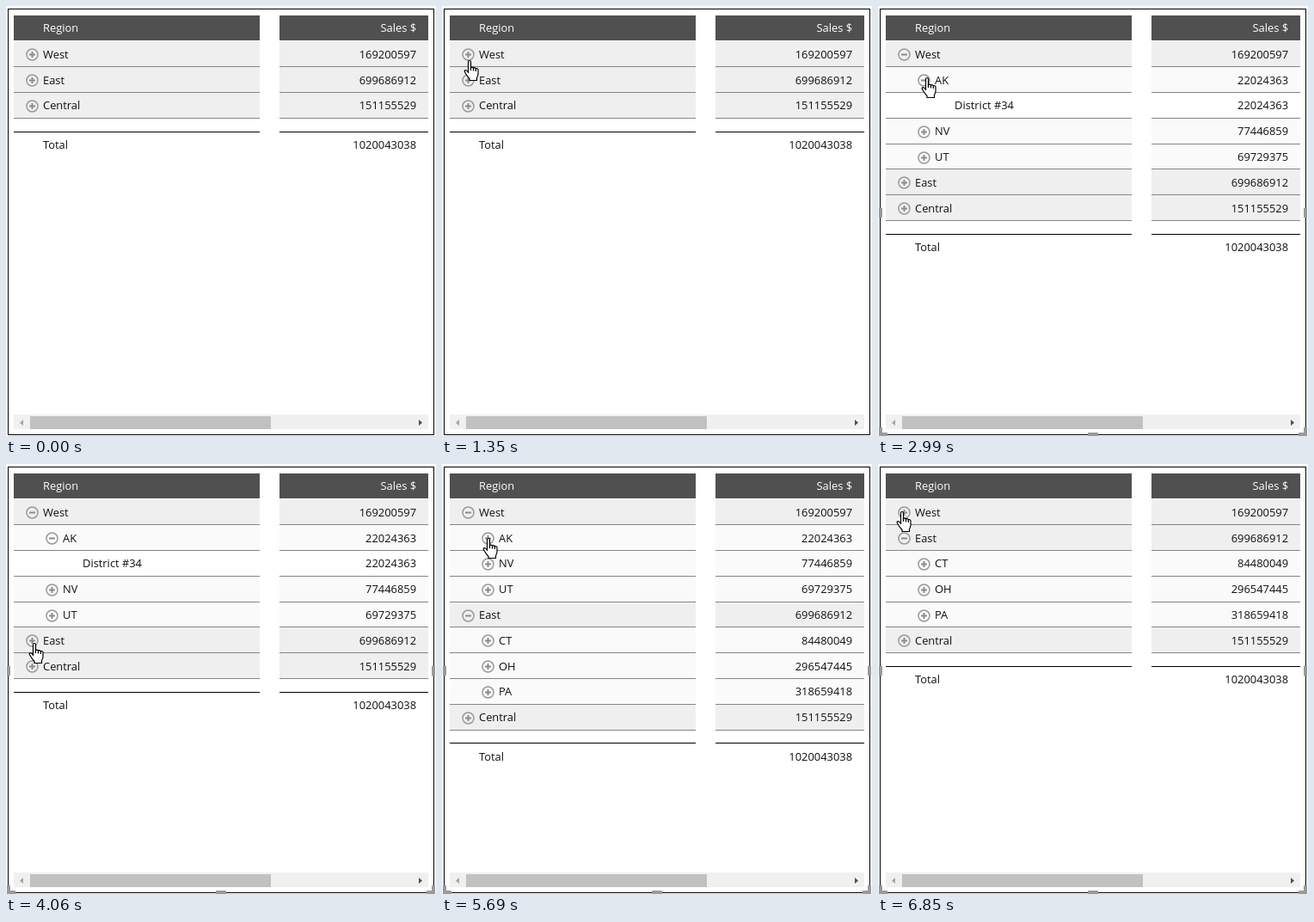
Recreate the animation shown at these times as an HTML page with a canvas. Size 500 by 500 pixels, loop 7820 ms.

```html
<!DOCTYPE html>
<html lang="en">
<head>
<meta charset="utf-8">
<title>Expandable sales table</title>
<style>
  html, body { margin: 0; width: 100%; height: 100%; overflow: hidden; background: #fff; }
  canvas { display: block; width: 500px; height: 500px; }
</style>
</head>
<body>
<canvas id="stage" width="500" height="500"></canvas>
<script>
const ctx = document.getElementById('stage').getContext('2d');
const LOOP = 7820;
const ROW_H = 29.8;
const TOP = 40.8;
const ICON_X = [30.5, 53.5];
const TEXT_X = [43, 66, 89];
const ROW_FILL = ['#efefef', '#fafafa', '#ffffff'];
const COLUMNS = [[9, 286], [318, 173]];
const SELECTED_AT = 1930;

const node = (name, sales, children = []) => ({ name, sales, children });
const regions = [
  node('West', 169200597, [
    node('AK', 22024363, [node('District #34', 22024363)]),
    node('NV', 77446859),
    node('UT', 69729375)
  ]),
  node('East', 699686912, [
    node('CT', 84480049),
    node('OH', 296547445),
    node('PA', 318659418)
  ]),
  node('Central', 151155529)
];

const expansions = [
  [0, []],
  [1930, ['West']],
  [2990, ['West', 'AK']],
  [4360, ['West', 'AK', 'East']],
  [5690, ['West', 'East']],
  [6850, ['East']]
];

// Pointer hot spot: time, x, y
const pointerPath = [
  [400, 2, 324], [700, 9, 187], [1190, 40, 74], [1350, 31, 63], [1560, 30, 57],
  [2130, 30, 57], [2730, 56, 83],
  [3150, 56, 83], [3680, 33, 223], [3810, 32, 212], [3960, 32, 212], [4060, 32, 208],
  [4710, 32, 208], [5280, 53, 86],
  [5780, 53, 86], [6130, 19, 59], [6240, 19, 59], [6390, 27, 55], [LOOP, 27, 55]
];

const ARROW = new Path2D('M.5.5V16.5L4.2 13L6.8 18.5L9 17.5L6.5 12.3H11.7Z');
const HAND = new Path2D('M5.5 15V2Q5.5.5 7 .5T8.5 2V8.5Q10 7.5 11.5 9Q13 8 14.3 9.8' +
  'Q16.2 9 17 11V16Q17 18 15.5 20.5V23.5H7V21.5Q4.5 19 2 14.8Q.8 12.8 1.3 12Q3 10.8 5.5 14Z');
const KNUCKLES = new Path2D('M8.5 8V12M11.5 9V12.5M14.3 10V13');

function box(x, y, w, h, color) {
  ctx.fillStyle = color;
  ctx.fillRect(x, y, w, h);
}

function label(text, x, y, color = '#111', align = 'left') {
  ctx.font = '12.9px "Open Sans", "Noto Sans", sans-serif';
  ctx.textAlign = align;
  ctx.fillStyle = color;
  ctx.fillText(text, x, y);
}

function cells(name, sales, x, baseline, color) {
  label(name, x, baseline, color);
  label(sales, 477, baseline, color, 'right');
}

function toggleIcon(x, y, open) {
  ctx.strokeStyle = '#999';
  ctx.lineWidth = 1.5;
  ctx.beginPath();
  ctx.arc(x, y, 6.5, 0, Math.PI * 2);
  ctx.stroke();
  box(x - 3.5, y - 1, 7, 2, '#8c8c8c');
  if (!open) box(x - 1, y - 3.5, 2, 7, '#8c8c8c');
}

function visibleRows(nodes, open, depth = 0) {
  return nodes.flatMap(item => {
    const isOpen = open.includes(item.name);
    const row = { ...item, depth, isOpen };
    return isOpen ? [row, ...visibleRows(item.children, open, depth + 1)] : [row];
  });
}

const rowTop = i => TOP + i * ROW_H;
const iconY = i => Math.floor(rowTop(i)) + 16.5;

function drawTable(rows) {
  for (const [x, w] of COLUMNS) box(x, 11, w, 29, '#505050');
  cells('Region', 'Sales $', 43, 30, '#fff');

  rows.forEach((row, i) => {
    const top = Math.floor(rowTop(i)) + 1;
    const bottom = Math.floor(rowTop(i + 1));
    for (const [x, w] of COLUMNS) {
      box(x, top, w, bottom - top, ROW_FILL[row.depth]);
      box(x, bottom, w, 1, '#858585');
    }
    cells(row.name, row.sales, TEXT_X[row.depth], Math.round(rowTop(i) + 20));
    if (row.depth < 2) toggleIcon(ICON_X[row.depth], iconY(i), row.isOpen);
  });

  const end = rowTop(rows.length);
  for (const [x, w] of COLUMNS) box(x, Math.floor(end + 15.9), w, 1, '#000');
  const total = regions.reduce((sum, region) => sum + region.sales, 0);
  cells('Total', total, 43, Math.round(end + 35.8));
}

function triangle(x, y, dir, color) {
  ctx.fillStyle = color;
  ctx.beginPath();
  ctx.moveTo(x + 2 * dir, y);
  ctx.lineTo(x - 2 * dir, y - 3.5);
  ctx.lineTo(x - 2 * dir, y + 3.5);
  ctx.fill();
}

function drawFrame(selected) {
  ctx.strokeStyle = '#000';
  ctx.lineWidth = 1;
  ctx.strokeRect(2.5, 3.5, 495, 495);
  box(9, 475, 482, 17, '#f0f0f0');
  box(28, 477, 280, 15, '#c1c1c1');
  triangle(18, 484.5, -1, '#a3a3a3');
  triangle(482, 484.5, 1, '#505050');
  if (!selected) return;
  const gray = '#999';
  for (const x of [1, 495]) box(x, 235, 4, 11, gray);
  box(244, 496, 12, 4, gray);
  for (const [x, edge] of [[1, 1], [489, 495]]) {
    box(x, 496, 10, 4, gray);
    box(edge, 490, 4, 10, gray);
  }
}

function pointerAt(t) {
  const next = pointerPath.findIndex(p => p[0] > t);
  if (next < 1) return null;
  const [t0, x0, y0] = pointerPath[next - 1];
  const [t1, x1, y1] = pointerPath[next];
  const k = (t - t0) / (t1 - t0);
  const ease = k * k * (3 - 2 * k);
  return [Math.round(x0 + (x1 - x0) * ease), Math.round(y0 + (y1 - y0) * ease)];
}

function drawPointer(t, rows) {
  const pos = pointerAt(t);
  if (!pos) return;
  const [x, y] = pos;
  const overIcon = rows.some((row, i) =>
    row.depth < 2 && Math.hypot(x - ICON_X[row.depth], y - iconY(i)) < 8);
  ctx.save();
  ctx.translate(overIcon ? x - 6 : x, y);
  ctx.fillStyle = '#fff';
  ctx.strokeStyle = '#000';
  ctx.lineWidth = overIcon ? 1.2 : 1;
  const shape = overIcon ? HAND : ARROW;
  ctx.fill(shape);
  ctx.stroke(shape);
  if (overIcon) ctx.stroke(KNUCKLES);
  ctx.restore();
}

function draw(t) {
  const open = expansions.filter(([start]) => start <= t).pop()[1];
  const rows = visibleRows(regions, open);
  box(0, 0, 500, 500, '#fff');
  drawFrame(t >= SELECTED_AT);
  drawTable(rows);
  drawPointer(t, rows);
}

const startTime = performance.now();
function tick() {
  draw((performance.now() - startTime) % LOOP);
  requestAnimationFrame(tick);
}
tick();
</script>
</body>
</html>
```
